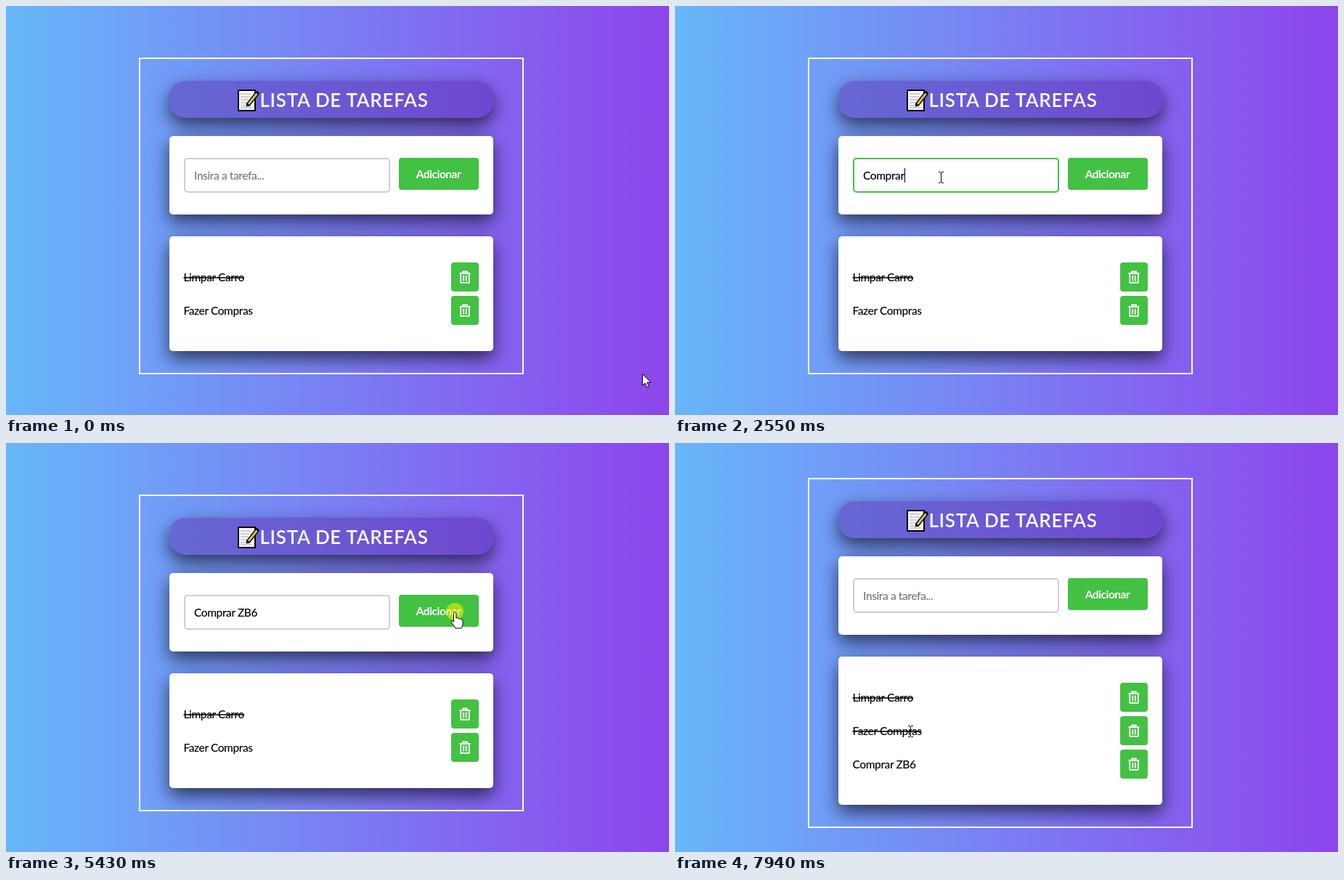
Write an HTML page that moves like this. It is 913 by 563 pixels and loops after 8000 ms.

```html
<!DOCTYPE html>
<html lang="pt">
<head>
<meta charset="utf-8">
<title>Lista de tarefas</title>
<style>
  html, body { margin: 0; width: 100%; height: 100%; overflow: hidden; }
  svg { display: block; width: 913px; height: 563px; }
  text { font: 500 15.5px Lato, sans-serif; letter-spacing: -.4px; white-space: pre; }
  .title { font-size: 26px; font-weight: 600; letter-spacing: .7px; fill: #fff; text-anchor: middle; }
  .button { font-weight: 700; letter-spacing: -.5px; fill: #fff; text-anchor: middle; }
  .done { text-decoration: line-through; }
</style>
</head>
<body>
<svg viewBox="0 0 913 563">
  <defs>
    <linearGradient id="sky"><stop stop-color="#67b7fa"/><stop offset="1" stop-color="#8e45ec"/></linearGradient>
    <linearGradient id="bar"><stop stop-color="#6768d4"/><stop offset="1" stop-color="#6e48d0"/></linearGradient>
    <filter id="blur" filterUnits="userSpaceOnUse" x="150" y="40" width="600" height="540">
      <feGaussianBlur stdDeviation="12.5"/>
    </filter>
    <g id="trash">
      <rect width="38" height="40" rx="4" fill="#43c143"/>
      <path d="M11.5 15H26.5M16 14.5V12.5H22V14.5M13.2 15.5V27.8H24.8V15.5M17.2 17.8V25.5M20.8 17.8V25.5"
        fill="none" stroke="#fff" stroke-width="1.8" stroke-linejoin="round"/>
    </g>
  </defs>

  <rect width="913" height="563" fill="url(#sky)"/>
  <g id="page">
    <rect id="frame" x="184" y="72" width="528" height="434" fill="none" stroke="#fff" stroke-width="2"/>
    <g filter="url(#blur)" opacity=".63">
      <rect x="225" y="113" width="446" height="51" rx="22"/>
      <rect x="225" y="189" width="446" height="108" rx="5"/>
      <rect class="list" x="225" y="327" width="446" height="158" rx="5"/>
    </g>

    <rect x="225" y="103" width="446" height="51" rx="22" fill="url(#bar)"/>
    <rect x="320" y="116" width="23" height="28" fill="#f6f6f6" stroke="#000" stroke-width="2"/>
    <path d="M323 121H337M323 125H337M323 129H334M323 133H331M323 137H330M323 140H339" stroke="#aaa"/>
    <path d="M345.5 120.5L334 135" stroke="#000" stroke-width="6" stroke-linecap="round"/>
    <path d="M345.5 120.5L334 135" stroke="#d2c24a" stroke-width="3"/>
    <path d="M330.5 139L332 134.5L335 137Z"/>
    <text class="title" x="465.5" y="139">LISTA DE TAREFAS</text>

    <rect x="225" y="179" width="446" height="108" rx="5" fill="#fff"/>
    <rect id="input" x="246" y="210" width="282" height="46" rx="4" fill="#fff" stroke-width="2"/>
    <text id="entry" x="259" y="239"></text>
    <rect id="caret" y="223" width="1" height="20"/>
    <rect x="541" y="209" width="110" height="44" rx="4" fill="#43c143"/>
    <text class="button" x="595.5" y="237">Adicionar</text>

    <rect class="list" x="225" y="317" width="446" height="158" rx="5" fill="#fff"/>
    <text class="done" x="244.5" y="379">Limpar Carro</text>
    <use href="#trash" x="613" y="353"/>
    <text id="second" x="244.5" y="425">Fazer Compras</text>
    <use href="#trash" x="613" y="399"/>
    <g id="third">
      <text x="244.5" y="471">Comprar ZB6</text>
      <use href="#trash" x="613" y="445"/>
    </g>
  </g>

  <g id="cursor">
    <circle id="click" r="12" fill="#ffee00" fill-opacity=".55"/>
    <path id="arrow" d="M.5 .5V16.5L4.2 13L6.8 19L9.4 17.9L6.8 12.1H12Z" fill="#fff" stroke="#000"/>
    <path id="beam" d="M-3 -7.5H-1L.5 -6.5L2 -7.5H4M-3 7.5H-1L.5 6.5L2 7.5H4M.5 -6.5V6.5" fill="none" stroke="#000"/>
    <path id="hand" d="M-1.5 14V2.5a1.7 1.7 0 0 1 3.4 0V9q2-1 3.2.8 2-.8 3 .8 3-.3 3 2.2V17q0 3-2 6H.8Q-1 19-4.5 15.5-6 12.5-3.2 12.8Z"
      fill="#fff" stroke="#000"/>
  </g>
</svg>
<script>
const LOOP = 8000, FOCUS = 950, BLUR = 5360, ADDED = 5500, DONE = 7540;
const TASK = 'Comprar ZB6';
// One entry per key; the first is the click that starts the caret blinking.
const KEYS = [880, 1680, 1880, 2010, 2210, 2340, 2480, 2550, 3410, 3880, 4010, 4540];
const CLICKS = [[870, 950], [5360, 5500], [7470, 7610]];
const MOVES = [
  { start: 70, step: 67, count: 11, path: [[876, 506], [850, 0], [600, 50], [366, 236]] },
  { start: 4740, step: 69, count: 9, path: [[366, 236], [450, 234], [534, 233], [618, 232]] },
  { start: 5900, step: 70, count: 12, path: [[618, 232], [560, 138], [390, 210], [304, 401]] },
  { start: 6740, step: 70, count: 6, path: [[304, 401], [296, 402], [288, 401], [280, 400]] },
  { start: 7940, step: 60, count: 1, path: [[280, 400], [290, 400], [310, 398], [324, 397]] }
];

const el = id => document.getElementById(id);
const set = (node, attrs) => Object.entries(attrs).forEach(([k, v]) => node.setAttribute(k, v));
const show = (node, on) => set(node, { visibility: on ? 'visible' : 'hidden' });
const ease = u => (1 - Math.cos(Math.PI * u)) / 2;

function bezier(path, u) {
  const v = 1 - u;
  return [0, 1].map(i => v ** 3 * path[0][i] + 3 * v * v * u * path[1][i]
    + 3 * v * u * u * path[2][i] + u ** 3 * path[3][i]);
}

function pointer(t) {
  const move = MOVES.filter(m => t >= m.start).pop();
  if (!move) return MOVES[0].path[0];
  const steps = Math.min(move.count, Math.floor((t - move.start) / move.step) + 1);
  return bezier(move.path, ease(steps / move.count));
}

function cursorKind(x, y, added) {
  const inside = (l, t, r, b) => x >= l && x < r && y >= t && y < b;
  if (inside(541, 209, 651, 253) || inside(613, 353, 651, 439)) return 'hand';
  const overText = inside(245, 209, 529, 257) || inside(352, 116, 579, 145)
    || inside(244, 362, 328, 386) || inside(244, 408, 338, 434)
    || added && inside(244, 454, 328, 480);
  return overText ? 'beam' : 'arrow';
}

function draw(t) {
  const added = t >= ADDED, focused = t >= FOCUS && t < BLUR;
  const shift = added ? -23 : 0, extra = added ? 46 : 0;
  set(el('page'), { transform: `translate(0 ${shift})` });
  set(el('frame'), { height: 434 + extra });
  document.querySelectorAll('.list').forEach(r => set(r, { height: 158 + extra }));
  show(el('third'), added);
  el('second').classList.toggle('done', t >= DONE);

  const pressed = KEYS.filter(k => k <= t);
  const typed = added ? '' : TASK.slice(0, Math.max(0, pressed.length - 1));
  const entry = el('entry');
  entry.textContent = typed || 'Insira a tarefa...';
  set(entry, { fill: typed ? '#000' : '#757575' });
  set(el('input'), { stroke: focused ? '#43c143' : '#cfcfcf' });
  const end = typed ? entry.getComputedTextLength() : 0;
  set(el('caret'), { x: Math.round(259 + end) });
  show(el('caret'), focused && (t - pressed[pressed.length - 1]) % 1060 < 530);

  const [x, y] = pointer(t).map(Math.round);
  const kind = cursorKind(x, y - shift, added);
  set(el('cursor'), { transform: `translate(${x} ${y})` });
  ['arrow', 'beam', 'hand'].forEach(id => show(el(id), id === kind));
  show(el('click'), CLICKS.some(([from, to]) => t >= from && t < to));
}

const begin = performance.now();
function tick() {
  draw((performance.now() - begin) % LOOP);
  requestAnimationFrame(tick);
}
tick();
</script>
</body>
</html>
```
